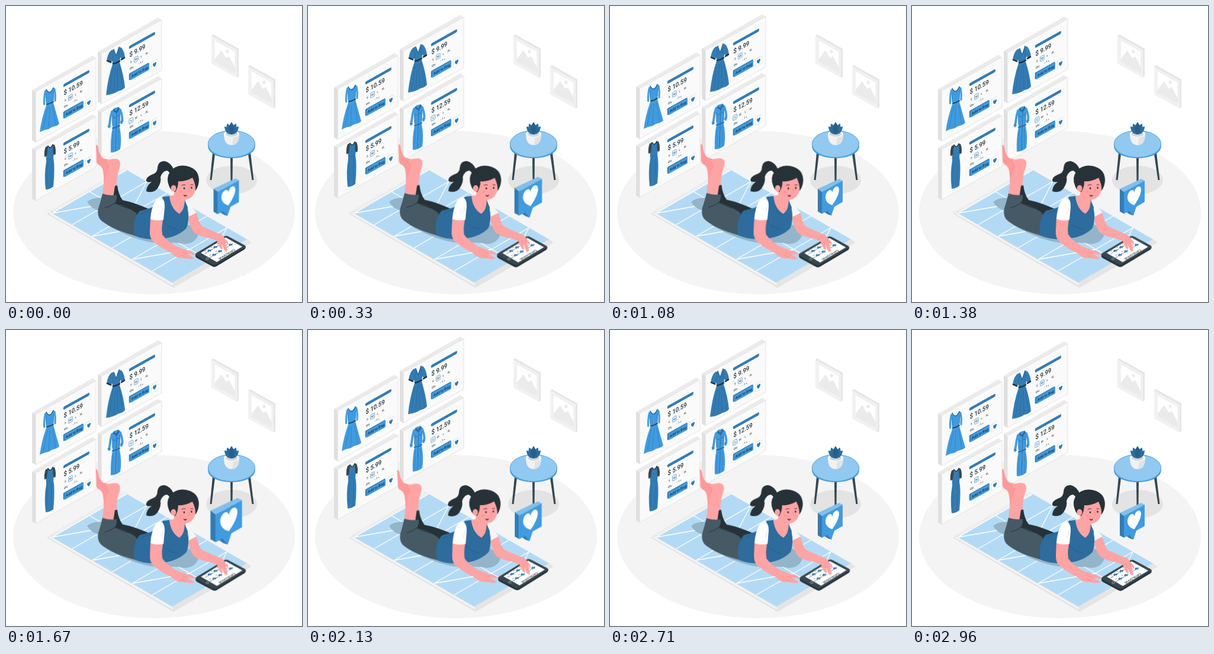
Animation, 500 px wide and 500 px high, one loop 3000 ms. Source, as an HTML page:

```html
<!DOCTYPE html>
<html lang="en">
<head>
<meta charset="utf-8">
<title>Online catalogue</title>
<style>
html, body { margin: 0; width: 100%; height: 100%; overflow: hidden; background: #fff; }
svg { display: block; width: 100vw; height: 100vh; }
text { font-family: Inter, "Open Sans", sans-serif; fill: #263238; }
.price { font: 500 11px Roboto, sans-serif; }
.line { fill: none; stroke-linecap: round; stroke-linejoin: round; }
.small { font-size: 4.6px; font-weight: 500; text-anchor: middle; }
</style>
</head>
<body>
<svg id="stage" viewBox="0 0 500 500"></svg>
<script>
const BLUE = '#409be0', MID = '#337cb3', DEEP = '#2d6c9d', INK = '#37474f', NIGHT = '#263238';
const SKIN = '#ffa4a4', BLUSH = '#f28b8d';
const HEART = 'M0 6C-9-.5-6.5-7 -3-7C-1.2-7-.3-5.5 0-4C.3-5.5 1.2-7 3-7C6.5-7 9-.5 0 6Z';

const path = (d, fill, extra = '') => `<path d="${d}" fill="${fill}" ${extra}/>`;
const poly = (pts, fill, extra = '') => `<polygon points="${pts}" fill="${fill}" ${extra}/>`;
const line = (d, color, w = 1) => `<path class="line" d="${d}" stroke="${color}" stroke-width="${w}"/>`;
const oval = (x, y, rx, ry, fill) => `<ellipse cx="${x}" cy="${y}" rx="${rx}" ry="${ry}" fill="${fill}"/>`;
const group = (body, attrs) => `<g ${attrs}>${body}</g>`;
const at = (x, y) => `transform="translate(${x} ${y})"`;

// Dresses are drawn relative to the first card's place.
const dresses = [
  path('M66 143L68 141Q74 150 80 138L82 139L80 163Q85 182 90 199Q87 202 83 203Q77 204 72 208Q64 209 57 213Q60 190 68 168Z', BLUE)
    + line('M66.500 144Q64 154 64.500 166M82 140.500Q84 150 83 160', BLUE, 3)
    + line('M68 141Q74 152 80 138', DEEP, 1.6)
    + line('M69 166Q75 165 80 161.500', INK, 2)
    + line('M70 172L63 207M74 171L72 205M79 169L84 201M68 148L68 162M80.500 145L80 158', MID, .7),
  path('M67 140L71 138L75 148L80 134L84 135L81 160Q88 182 90 202Q86 207 79 208Q70 214 58 215Q61 186 69 163Z', MID)
    + path('M67 139L71 138L70 156L65 160L59 157Q61 144 67 139ZM80 134L84 135Q89 141 90 152L86 155L81 150Z', MID)
    + line('M60 157L66 159.500M84 155L89 152', NIGHT, 2.6)
    + line('M71 138L75 149L80 134', DEEP, 1.6)
    + line('M70 162Q76 161 81 157.500', NIGHT, 2.4)
    + line('M70 168L64 210M74 168L71 210M77 166L78 207M80 164L86 203M70 142L69 156M80 139L80 152', DEEP, .9),
  path('M67 140L71 137Q75 143 79 135L82 137L80 158Q83 172 80 206Q74 211 67 211Q64 186 68 164Z', MID)
    + path('M67 139L71 137L69 154L65 156Q64 146 67 139ZM79 135L82 135.500Q85 143 83.500 152L80 152Z', INK)
    + line('M71 137Q75 144 79 135', NIGHT, 1.4)
    + line('M70 164L69 207M77 162L76 207M70 160Q75 161 79 157', DEEP, .8),
  path('M68 142L72 138L79 136L82 139L81 170Q85 190 82 207Q75 213 66 213Q65 190 69 172Z', BLUE)
    + line('M68 144Q65 153 64.500 161L63 170M82 141Q85 149 85.500 156L84 163', BLUE, 3.8)
    + path('M71 139L75 143L79 136L81 139L76 147L70 143Z', DEEP)
    + line('M69 172Q75 171 81 167.500', DEEP, 2)
    + line('M76 145L74 210M69 150L69 167M81 146L81 163M61 168L66 169M83 161L87 160M70 154h4M77 151h3', DEEP, .9)
    + line('M70 176L69 210M79 174L79 207', MID, .7)
];

function card(x, y, price, dress, sizeAt) {
  const sizes = [['S', 58], ['M', 68], ['L', 78], ['XL', 89]]
    .map(([s, sx]) => `<text class="small" x="${sx}" y="44">${s}</text>`).join('');
  const face = `
    <rect x="54" y="13.6" width="51" height="5" rx="2.2" fill="${MID}"/>
    <text class="price" x="55" y="32.6">${price}</text>
    <rect x="${sizeAt - 3.8}" y="38.2" width="7.6" height="8" rx="1" fill="none" stroke="${BLUE}" stroke-width=".8"/>
    ${sizes}
    <text class="small" x="59" y="54">Qty</text><text class="small" x="77" y="54">- 1 +</text>
    <rect x="54" y="60" width="39" height="11.5" rx="1.5" fill="${MID}"/>
    <rect x="56.5" y="61.6" width="37" height="11" rx="1.2" fill="${BLUE}"/>
    <text x="75" y="69.2" font-size="6.2" font-weight="600" text-anchor="middle">Add to Bag</text>
    <rect x="97" y="61.5" width="12.5" height="14" rx="2" fill="#e4e4e4"/>
    <rect x="98" y="62.5" width="12" height="13" rx="2" fill="#fff" stroke="#e6e6e6" stroke-width=".6"/>
    <path d="${HEART}" transform="translate(104 69.4) scale(.56)" fill="${MID}"/>`;
  return group(
    poly('44,142 146,84 152,88 50,145', '#ebebeb')
    + poly('44,142 50,145 50,230 44,226.5', '#e0e0e0')
    + poly('50,145 152,88 152,173 50,230', '#fafafa', 'stroke="#dedede" stroke-width=".8"')
    + dresses[dress]
    + group(face, 'transform="matrix(.866 -.485 0 1 50 145)"'), at(x, y));
}

function picture(x, y) {
  return group(
    poly('347,50 350,48 393,72 393,119 390,121 347,97', '#e6e6e6')
    + poly('347,50 390,74 390,121 347,97', '#f2f2f2')
    + poly('352,57 387,77 387,114 352,94', '#fff', 'stroke="#e6e6e6" stroke-width=".8"')
    + path('M353 94L353 89L364 75L372 88L377 85L387 104L387 113Z', '#ebebeb')
    + oval(374, 77, 2.6, 3, '#ebebeb'), at(x, y));
}

function rug() {
  const columns = 6;
  let weave = 'M0 .5H1', fringe = '';
  for (let k = 0; k < columns; k++) {
    const a = k / columns, b = (k + 1) / columns;
    weave += `M${a} 0V1` + (k % 2 ? `M${b} .5L${a} 1` : `M${a} 0L${b} .5`);
  }
  for (let i = 0; i <= 30; i++) {
    const x = i * 4.2, y = -i * 2.43;
    fringe += `M${281 + x} ${467 + y}l6 5M${78 + x} ${350 + y}l-7 -2`;
  }
  return poly('69,351 78,346 281,463 407,394 414,400 283,476', '#e4e4e4')
    + line(fringe, '#e6e6e6', 1.6)
    + poly('78,350 204,277 407,394 281,467', '#b3daf5')
    + group(`<path d="${weave}" fill="none" stroke="#fff" stroke-width="1.3" vector-effect="non-scaling-stroke"/>`,
        'transform="matrix(203 117 126 -73 78 350)"')
    + line('M74 350L281 470', '#f4f4f4', 3);
}

function table() {
  const leaves = [[-42, .95], [42, .95], [-22, 1.05], [22, 1.05], [0, 1.1]]
    .map(([r, s]) => path('M0 0C-7-6-4-14 0-19C4-14 7-6 0 0Z', r ? DEEP : '#285f88',
      `transform="translate(381 217) rotate(${r}) scale(${s})"`)).join('');
  return oval(381, 294, 43, 24, '#e3e3e3')
    + poly('349,248 353,250 347.500,294 344.500,294', INK)
    + poly('379,254 383,254 382.500,298 379.500,298', INK)
    + poly('409,250 413,248 418.500,294 415.500,294', INK)
    + path('M341 233V236C341 264 421 264 421 236V233Z', BLUE)
    + oval(381, 233, 40, 23, '#92c9f0')
    + `<ellipse cx="381" cy="233" rx="39.6" ry="22.6" fill="none" stroke="${BLUE}" stroke-width=".8"/>`
    + path('M368 216Q368 235 381 235Q394 235 394 216Z', '#f1f1f1')
    + path('M384 220L394 216Q394 233 382 235Z', '#e2e2e2')
    + oval(381, 216, 13, 6, '#fafafa') + oval(381, 216.5, 10, 4.2, '#d5d5d5') + leaves;
}

function tablet() {
  const items = [[343, 413], [353, 407], [363, 401], [351, 420], [361, 414], [379, 403]]
    .map(([x, y]) => path('M-3 1L-1-2L1-1L4-2L3 2L1 1L-1 3Z', MID, at(x, y))
      + line(`M${x - 5} ${y}l-2 1.200M${x - 3} ${y + 3}l-4 2.400`, INK, .7)).join('');
  return path('M320 420L320 423Q321 425 323 426L349 440Q352 441.500 355 440L403 411Q405 409 405 406Z', NIGHT)
    + path('M322 417L369 389Q372 387.500 375 389L403 404Q406 406 403 408L355 436.500Q352 438 349 436.500L322 422Q318 419.500 322 417Z', INK)
    + poly('329,417 371,391 399,406.500 356,432.500', '#fff')
    + items
    + '<ellipse cx="340" cy="427" rx="2.4" ry="1.6" fill="none" stroke="#b0bec5" stroke-width=".7"/>'
    + '<text transform="matrix(-.87 .52 -.87 -.5 385 410.5)" font-size="5.2" font-weight="600">CATALOGUE</text>';
}

function woman() {
  const legs = path('M152 235Q155 234 156 240Q157 251 164 257L174 260L180 270L172 296L170 318L163 318Q167 298 164 279Q163 271 156 268Q152 265 153 257Z', '#ff9a9b')
    + path('M168 262Q172 259 184 258Q192 258 193 265Q193 272 189 282Q186 298 187 322L163 320Q164 298 172 276Q175 268 168 262Z', SKIN)
    + line('M167 262Q174 266 173 274', BLUSH, .8)
    + path('M184 304L188 303Q190 319 197 328Q218 332 246 345L233 366L178 345Z', NIGHT)
    + path('M163 317Q174 321 187 319Q188 326 184 333Q205 339 219 349L226 360L218 388Q181 378 163 364Q153 357 156 342Q160 330 163 317Z', '#455a64')
    + line('M184 333Q176 339 167 341M184 333Q202 343 229 346', NIGHT, 1);
  const body = path('M217 388Q212 362 226 346Q239 343 247 340L266 322L299 323L306 340Q311 359 305 375Q292 389 266 393Q240 397 217 388Z', DEEP)
    + line('M265 362Q271 374 289 377M247 344Q236 346 228 352', '#285f88', 1)
    + path('M302 329Q318 342 323 351L309 357Q309 342 302 329Z', '#f5f5f5');
  const neck = path('M284 308L304 320L303 331Q301 344 293 351Q276 342 275 322L284 319Z', SKIN)
    + path('M286 314Q291 326 303 326L303 321Z', BLUSH)
    + path('M267 322L276 321Q278 343 295 353Q301 343 302 328L307 340L305 356L284 362L266 346Z', DEEP);
  const nearArm = path('M244 357L266 358Q262 373 264 386Q271 396 286 405Q303 412 309 413Q317 416 321 420Q313 420 306 418L318 426Q313 429 304 426L295 426Q286 425 279 417Q263 410 249 398Q242 392 243 379Z', SKIN)
    + line('M306 418L298 416M304 425L296 421', BLUSH, .8)
    + path('M262 323Q269 328 268 340L266 361Q255 364 244 360Q245 343 251 331Q255 324 262 323Z', '#fff')
    + line('M266 338L262 351', '#dedede', .8);
  const farArm = path('M308 356L322 349Q325 365 331 372L356 383Q366 385 370 393Q375 397 376 403L371 400L374 412Q372 416 369 413L364 401L366 410Q363 412 361 408L356 397Q348 393 343 392Q325 389 317 382Q309 371 308 356Z', SKIN)
    + line('M364 401L361 394M370 400L366 393', BLUSH, .8);
  const head = path('M284 277Q278 264 268 262Q257 262 256 273Q256 282 246 285Q236 289 237 296Q241 299 246 297Q237 304 237 313Q249 317 256 308Q263 297 261 289Q264 279 272 278Q277 280 279 290Z', NIGHT)
    + path('M284 288Q283 309 288 317Q294 327 304 327Q316 325 320 311Q325 292 317 283Q298 273 284 288Z', SKIN)
    + path('M286 314Q278 313 275 303Q270 291 277 280Q287 267 304 270Q325 274 326 293Q326 304 320 312Q321 302 315 290Q303 297 291 296Q291 306 286 314Z', NIGHT)
    + oval(283, 308, 4.4, 5.6, SKIN)
    + line('M281 306Q285 307 284 311', BLUSH, .8)
    + oval(301, 308, 1.3, 1.8, NIGHT) + oval(313.5, 307, 1.3, 1.8, NIGHT)
    + line('M297 303Q300 301 303 302M312 302L316 302', NIGHT, .9)
    + line('M308 308Q312 313 309 314', BLUSH, 1)
    + oval(296, 314, 2.8, 2, '#ff9799')
    + path('M299.500 318.500Q303 320 306 319Q305 322.500 302.500 322Q300 321.500 299.500 318.500Z', '#7b3f43');
  return legs + body + neck + nearArm + head + tablet() + farArm;
}

const bubble = poly('351,309 387,292 393,295 358,314', '#82bfea')
  + poly('351,309 358,314 358,351 351,347', MID)
  + path('M362 348L368 352L374 354L370 344Z', MID)
  + path('M358 314L393 295V331L379 339L374 354L367 346L358 351Z', BLUE)
  + path(HEART, '#fff', 'transform="matrix(1.85 -1 0 2.15 375.5 323.5)"');

const cards = [
  card(111, -64.5, '$ 9.99', 1, 68), card(111, 34.5, '$ 12.59', 3, 58),
  card(0, 0, '$ 10.59', 0, 68), card(0, 99, '$ 5.99', 2, 68)
].join('');

document.getElementById('stage').innerHTML =
  oval(250, 349, 238, 138, '#f4f4f4')
  + picture(0, 0) + picture(62, 52)
  + table() + rug()
  + path('M137 331Q145 323 163 324L160 347Q143 342 137 331ZM170 369L300 366Q322 374 325 386Q320 401 302 402Q285 398 268 401Q222 401 170 369Z', '#93b4c9')
  + group(cards, 'id="cards"')
  + group(woman(), 'id="woman"')
  + group(bubble, 'id="bubble"');

function play(id, origin, steps, duration, delay = 0) {
  const el = document.getElementById(id);
  el.style.transformOrigin = origin;
  el.animate(steps.map(([offset, transform]) => ({ offset, transform })),
    { duration, delay, iterations: Infinity, easing: 'linear' });
}

const beat = [[0, 1], [.1, 1.3], [.3, 1], [.4, 1], [.5, 1.3], [.6, 1], [1, 1]];
play('cards', '0 0', [[0, 'translateY(0px)'], [.5, 'translateY(-10px)'], [1, 'translateY(0px)']], 1500);
play('woman', '278px 337px', [[0, 'rotate(0deg)'], [.25, 'rotate(1deg)'], [.75, 'rotate(-1deg)'], [1, 'rotate(0deg)']], 3000);
play('bubble', '372px 323px', beat.map(([o, s]) => [o, `scale(${s})`]), 1500, -10);
</script>
</body>
</html>
```
